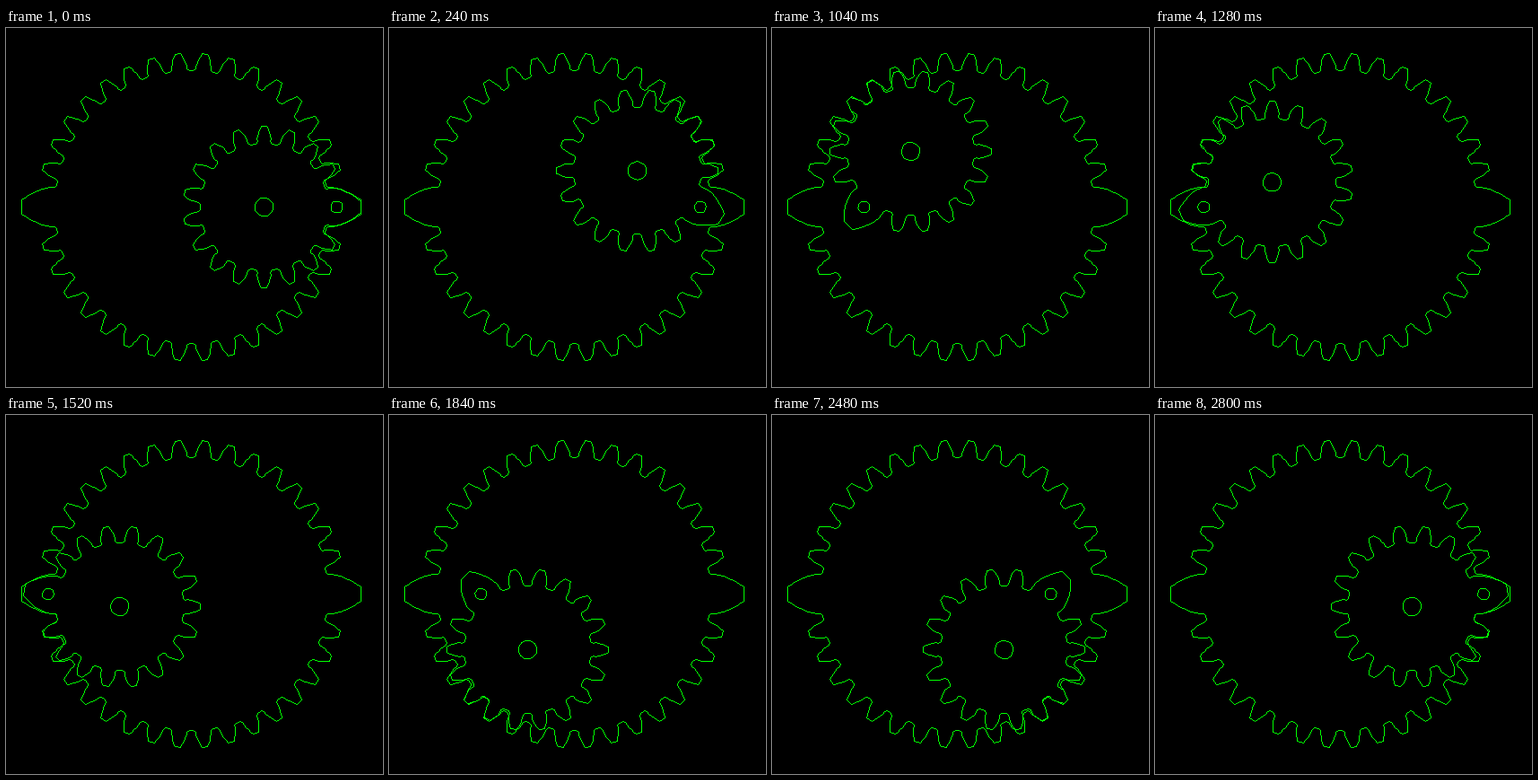
Animation, 420 px wide and 400 px high, one loop 2880 ms. Source, as an HTML page with a canvas:

```html
<!DOCTYPE html>
<html>
<head>
<meta charset="utf-8">
<title>Hypocycloid gears</title>
<style>
html, body { margin: 0; width: 100%; height: 100%; overflow: hidden; background: #000; }
canvas { display: block; width: 420px; height: 400px; image-rendering: pixelated; }
</style>
</head>
<body>
<canvas id="stage" width="420" height="400"></canvas>
<script>
const ctx = document.getElementById('stage').getContext('2d');
const CX = 206, CY = 199, ORBIT = 81;
const LOOP = 2880, STEP = 80, TAU = Math.PI * 2;
const PRESSURE = Math.PI / 9;
const inv = a => Math.tan(a) - a;

// Outline in polar points [radius, angle]; each lobe has one wide tooth
// that spans two pitches, followed by regular involute teeth.
function gear({ teeth, lobes, pitchR, root, tip, bigTip }) {
  const pitch = TAU / teeth, base = pitchR * Math.cos(PRESSURE);
  const half = r => pitch / 4 + inv(PRESSURE) - inv(Math.acos(Math.min(1, base / r)));
  const pts = [];

  function tooth(mid, top, extra) {
    const side = [[root, half(root) + extra + 2 / root]];
    const low = root + 2, n = extra ? 8 : 5;
    for (let i = 0; i <= n; i++) {
      const r = low + (top - low) * i / n;
      side.push([r, half(r) + extra]);
    }
    side.forEach(([r, a]) => pts.push([r, mid - a]));
    side.reverse().forEach(([r, a]) => pts.push([r, mid + a]));
  }

  for (let l = 0; l < lobes; l++) {
    const start = l * TAU / lobes;
    tooth(start, bigTip, pitch / 2);
    for (let k = 0; k < teeth / lobes - 2; k++) tooth(start + (k + 1.5) * pitch, tip, 0);
  }
  return pts;
}

const circle = r => Array.from({ length: 24 }, (_, i) => [r, i * TAU / 24]);

const ring = gear({ teeth: 36, lobes: 2, pitchR: 162, root: 152, tip: 171, bigTip: 189 });
const pinion = gear({ teeth: 18, lobes: 1, pitchR: 81, root: 71, tip: 90, bigTip: 108 });
const hub = circle(10.2), pin = circle(6.4);

// One pixel wide line without antialiasing
function line(x, y, x2, y2) {
  const dx = Math.abs(x2 - x), dy = -Math.abs(y2 - y);
  const sx = x < x2 ? 1 : -1, sy = y < y2 ? 1 : -1;
  let err = dx + dy;
  for (;;) {
    ctx.fillRect(x, y, 1, 1);
    if (x === x2 && y === y2) return;
    const e = 2 * err;
    if (e >= dy) { err += dy; x += sx; }
    if (e <= dx) { err += dx; y += sy; }
  }
}

function outline(pts, x, y, turn) {
  const p = pts.map(([r, a]) => [
    Math.round(x + r * Math.cos(a + turn)),
    Math.round(y + r * Math.sin(a + turn))
  ]);
  p.forEach((q, i) => line(...q, ...p[(i + 1) % p.length]));
}

function draw(step) {
  const a = step * STEP / LOOP * TAU;
  const x = CX + ORBIT * Math.cos(a), y = CY - ORBIT * Math.sin(a);
  ctx.fillStyle = '#000';
  ctx.fillRect(0, 0, 420, 400);
  ctx.fillStyle = '#0f0';
  outline(ring, CX, CY, 0);
  outline(pinion, x, y, a);
  outline(hub, x, y, a);
  outline(pin, CX + 2 * ORBIT * Math.cos(a), CY, a);
}

let shown = -1;
function tick() {
  const step = Math.floor(performance.now() % LOOP / STEP);
  if (step !== shown) draw(shown = step);
  requestAnimationFrame(tick);
}
tick();
</script>
</body>
</html>
```
